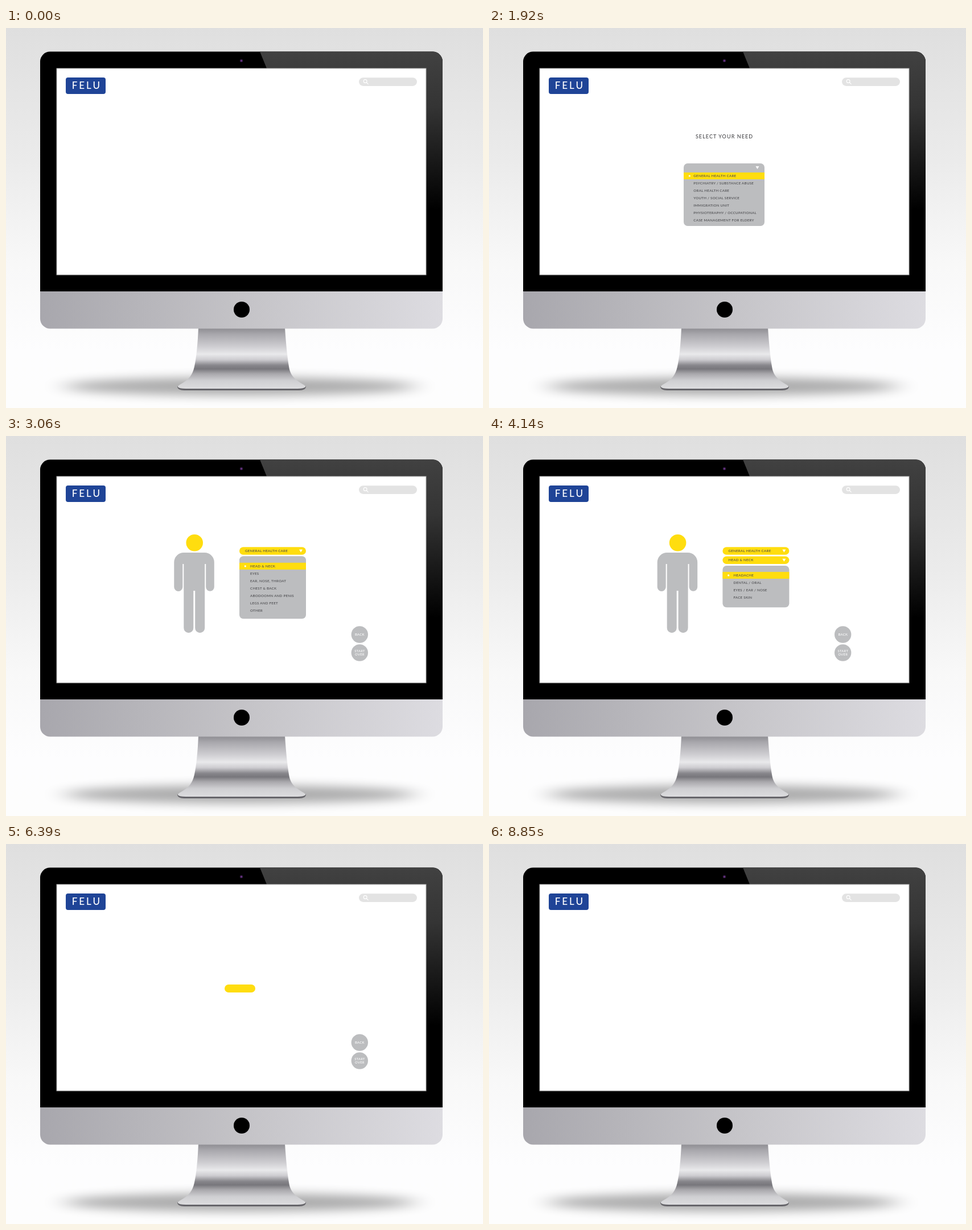
An HTML page that plays this animation: 838 by 668 pixels, repeating every 9030 ms.

```html
<!DOCTYPE html>
<html lang="en">
<head>
<meta charset="utf-8">
<title>Health guide on a desktop screen</title>
<style>
  html, body { margin: 0; width: 100%; height: 100%; overflow: hidden; background: #fff; }
  svg { display: block; width: 838px; height: 668px; }
  text { font-family: Lato, "Open Sans", sans-serif; font-weight: 500; white-space: pre; }
  .scene { opacity: 0; }
</style>
</head>
<body>
<svg viewBox="0 0 838 668" xmlns="http://www.w3.org/2000/svg">
  <defs>
    <linearGradient id="wall" x2="0" y2="1">
      <stop stop-color="#dfdfdf"/><stop offset=".35" stop-color="#ebebeb"/>
      <stop offset=".62" stop-color="#f8f8f8"/><stop offset=".85" stop-color="#fdfdfe"/>
      <stop offset="1" stop-color="#fdfdfd"/>
    </linearGradient>
    <linearGradient id="glare" x2="0" y2="1">
      <stop stop-color="#414141"/><stop offset=".35" stop-color="#343434"/><stop offset="1" stop-color="#000"/>
    </linearGradient>
    <linearGradient id="chin">
      <stop stop-color="#a8a7ad"/><stop offset=".5" stop-color="#c4c3c7"/><stop offset="1" stop-color="#dddce1"/>
    </linearGradient>
    <linearGradient id="stand" gradientUnits="userSpaceOnUse" x1="0" y1="528" x2="0" y2="636">
      <stop stop-color="#8f8e93"/><stop offset=".1" stop-color="#a9a8ad"/>
      <stop offset=".3" stop-color="#cfced2"/><stop offset=".42" stop-color="#e9e9eb"/>
      <stop offset=".51" stop-color="#cdccd0"/><stop offset=".6" stop-color="#88878c"/>
      <stop offset=".66" stop-color="#78777c"/><stop offset=".74" stop-color="#a9a8ac"/>
      <stop offset=".85" stop-color="#cfcfd2"/><stop offset="1" stop-color="#dedee0"/>
    </linearGradient>
    <filter id="soft" x="-20%" y="-200%" width="140%" height="500%"><feGaussianBlur stdDeviation="22 9"/></filter>
  </defs>

  <rect width="838" height="668" fill="url(#wall)"/>
  <ellipse cx="411" cy="630" rx="310" ry="16" fill="#000" opacity=".32" filter="url(#soft)"/>

  <path d="M301 630q0 7 12 7h202q12 0 12-7z" fill="#66656a"/>
  <path d="M338 527h152q3 45 7 68c2 15 10 23 24 31q6 3 5 5-3 3-14 3H316q-12 0-14-3-1-2 5-5c14-8 21-16 24-31q5-23 7-68z" fill="url(#stand)"/>

  <path d="M60 463V59a17.500 17.500 0 0 1 17.500-17.500h672A17.500 17.500 0 0 1 767 59v404z"/>
  <path d="M446 41.500h303.500A17.500 17.500 0 0 1 767 59v260h-29V71H458z" fill="url(#glare)"/>
  <path d="M60 463h707v48a17.500 17.500 0 0 1-17.500 17.500h-672A17.500 17.500 0 0 1 60 511z" fill="url(#chin)"/>
  <circle cx="413.500" cy="57.500" r="2.800" fill="#2a1838"/>
  <circle cx="413.500" cy="57.500" r="1.500" fill="#70358c"/>
  <circle cx="414" cy="495" r="14"/>
  <rect x="89" y="71" width="649" height="363" fill="#fff" stroke="#a5a5a5"/>

  <g id="page"></g>
</svg>

<script>
const LOOP = 9030;
const YELLOW = '#ffdd0f', GREY = '#bcbdbf', BLUE = '#1f4497', INK = '#48484b', WHITE = '#fff';

const el = (tag, attrs, body = '') =>
  `<${tag} ${Object.entries(attrs).map(([k, v]) => `${k}="${v}"`).join(' ')}>${body}</${tag}>`;
const box = (x, y, width, height, fill, rx = 0) => el('rect', { x, y, width, height, fill, rx });
const disc = (cx, cy, r, fill) => el('circle', { cx, cy, r, fill });

// y is the middle of the capitals
function text(x, y, str, size, gap = 0, fill = INK, weight = 500, anchor = 'start') {
  const shift = anchor === 'middle' ? gap / 2 : 0;
  return el('text', {
    x: x + shift, y: y + size * .36, fill, 'font-size': size,
    'letter-spacing': gap, 'font-weight': weight, 'text-anchor': anchor
  }, str.replace(/&/g, '&amp;'));
}
const mid = (x, y, str, size, gap, fill, weight) => text(x, y, str, size, gap, fill, weight, 'middle');
const item = (x, y, str, weight) => text(x, y, str, 6.2, .27, INK, weight);
const arrow = (x, y) => el('path', { d: `M${x - 3} ${y - 2.5}h6l-3 5z`, fill: WHITE });
const star = (x, y) => disc(x, y, 1.6, WHITE);

function bubble(x, y, r, fill, lines, size, gap, ink, weight, pitch) {
  const top = y - (lines.length - 1) * pitch / 2;
  return disc(x, y, r, fill) +
    lines.map((s, i) => mid(x, top + i * pitch, s, size, gap, ink, weight)).join('');
}

function pill(x, y, w, label, indent, weight) {
  return box(x, y, w, 13.5, YELLOW, 6.75) + item(x + indent, y + 6.8, label, weight) + arrow(x + w - 9, y + 6.8);
}

// Dropdown panel; pick is the highlighted row, -1 for none
function menu({ x, y, w, h, first, indent, rows, pick, dot = true }) {
  let out = box(x, y, w, h, GREY, 7);
  if (pick >= 0) {
    const cy = first + pick * 12.93;
    out += box(x, cy - 6, w, 12, YELLOW) + (dot ? star(x + 10.3, cy) : '');
  }
  return out + rows.map((s, i) => item(x + indent, first + i * 12.93, s)).join('');
}

const heading = (str, gap) => mid(413, 191, str, 9, gap);

const nav = bubble(621.3, 349, 14.7, GREY, ['BACK'], 6, .25, WHITE, 700, 0) +
  bubble(621.3, 381, 14.7, GREY, ['START', 'OVER'], 5.8, .3, WHITE, 700, 6.5);

const person = head => disc(331.2, 187.8, 14.8, head) + el('path', {
  d: 'M295.300 222a17 17 0 0 1 17-17h36.500a17 17 0 0 1 17 17v43.500a7.300 7.300 0 0 1-14.600 0V225h-2' +
     'V337.500a8.500 8.500 0 0 1-17 0V272h-2.900V337.500a8.500 8.500 0 0 1-17 0V225h-2V265.500a7.500 7.500 0 0 1-15 0z',
  fill: GREY
});

const needs = ['GENERAL HEALTH CARE', 'PSYCHIATRY / SUBSTANCE ABUSE', 'ORAL HEALTH CARE',
  'YOUTH / SOCIAL SERVICE', 'IMMIGRATION UNIT', 'PHYSIOTERAPHY / OCCUPATIONAL', 'CASE MANAGEMENT FOR ELDERY'];
const parts = ['HEAD & NECK', 'EYES', 'EAR, NOSE, THROAT', 'CHEST & BACK',
  'ABODOOMN AND PENIS', 'LEGS AND FEET', 'OTHER'];
const pains = ['HEADACHE', 'DENTAL / ORAL', 'EYES / EAR / NOSE', 'FACE SKIN'];

const start = mid(418, 201.5, 'HOW CAN WE HELP YOU?', 9, 1.35) +
  bubble(411.3, 284.3, 33, YELLOW, ['START'], 15, 1.3, BLUE, 500, 0);

const needTitle = heading('SELECT YOUR NEED', 1.08);
const needClosed = needTitle + box(342, 238, 142, 16, GREY, 7) + arrow(471.5, 245.5);
const needOpen = needTitle + menu({ x: 342, y: 238, w: 142, h: 110, first: 260, indent: 17.3, rows: needs, pick: 0 }) +
  arrow(471.5, 245.5);

const care = pill(410, 195.3, 117, 'GENERAL HEALTH CARE', 10);
const partStep = (head, pick) => person(head) + care + nav +
  menu({ x: 410, y: 211.3, w: 117, h: 110, first: 228.8, indent: 19, rows: parts, pick });
const painStep = pick => el('g', { transform: 'translate(.4)' }, person(YELLOW) + care + nav +
  pill(410, 211.4, 117, 'HEAD & NECK', 10, 700) +
  menu({ x: 410, y: 228, w: 117, h: 73.3, first: 244.9, indent: 19, rows: pains, pick }));

const severity = heading('HOW SEVERE IS YOUR HEADACHE?', 1.2).replace('x="413', 'x="416') +
  pill(375, 256.3, 75, 'HEADACHE', 17) + nav;
const levels = menu({ x: 375, y: 273.3, w: 76.3, h: 54, first: 286.1, indent: 12,
  rows: ['MILD', 'MODERATE', 'SEVERE'], pick: 2, dot: false });

const answer = fill => box(384, 247, 54, 14, fill, 7) + nav;

function result() {
  const note = ['The headache should resolve as your other symptoms',
    'improve. You can take over the counter pain relievers such',
    'as acetaminophen, ibuprofen, or naproxen for the',
    'headache. If the headache gets worse or doesnt resolve',
    'over the next several days, contact your doctor for', 'advice.'];
  const bold = (x, y, s, size = 7.2, gap = 1.12) => text(x, y, s, size, gap, INK, 700);
  return box(217.7, 170.3, 177, 152.5, YELLOW, 7) +
    bold(233, 184, 'POSSIBLE REASONS OF YOUR') + bold(233, 192, 'SYMTOMS ARE:') +
    box(217.7, 203.3, 177, 12, BLUE) + star(226, 209.2) +
    text(233, 209.4, 'FLU', 7, 1, WHITE, 700) + arrow(376, 209.4) +
    note.map((s, i) => text(239, 223.3 + i * 6.15, s, 4.9, .02)).join('') +
    ['STRESS', 'TUMOR', 'ETC'].map((s, i) => bold(233, 267 + i * 20.2, s) + arrow(376, 267 + i * 20.2)).join('') +
    ['THROUGHOUT YOUR DIGNOSIS, FELU', 'SUGGEST THAT MAKING CONTACT TO', 'HEALTH CENTER']
      .map((s, i) => text(429, 202.5 + i * 8.3, s, 7.6, .98, INK, 600)).join('') +
    bubble(447, 263.7, 18, GREY, ['CALL'], 7, 1.2, WHITE, 700, 0) +
    bubble(494.5, 263.7, 18, GREY, ['BOOKING', 'ONLINE'], 5.1, .4, WHITE, 700, 6.2) +
    bubble(542, 262.8, 18, GREY, ['EMERGENCY', 'CALL'], 5, 0, WHITE, 700, 6.2) +
    bubble(589.4, 262.6, 18, YELLOW, ['MORE', 'HELP'], 5.6, .7, INK, 700, 6.3) +
    bubble(501.6, 354, 29.7, YELLOW, ['DO YOU', 'NEED MORE', 'HELP?'], 6.2, .75, INK, 700, 7) + nav;
}

const header = box(105, 87, 70, 29, BLUE, 4) + mid(140.3, 101.3, 'FELU', 17, 3, WHITE) +
  box(620, 87.3, 102, 14.6, '#e3e3e3', 7.3) +
  el('path', { d: 'M633.300 95.600l3.200 3.200M634 93.500a2.900 2.900 0 1 1-5.800 0a2.900 2.900 0 1 1 5.800 0',
    fill: 'none', stroke: WHITE, 'stroke-width': 1.2 });

// [start in ms, picture]
const steps = [
  [0, start],
  [780, needClosed],
  [1920, needOpen],
  [2670, partStep(GREY, -1)],
  [3060, partStep(YELLOW, 0)],
  [3810, painStep(-1)],
  [4140, painStep(0)],
  [4920, severity],
  [5250, severity + levels],
  [6030, answer(GREY)],
  [6390, answer(YELLOW)],
  [7170, result()],
  [8850, '']
];

const page = document.getElementById('page');
page.innerHTML = header + steps.map(s => el('g', { class: 'scene' }, s[1])).join('');

page.querySelectorAll('.scene').forEach((scene, i) => {
  const from = steps[i][0] / LOOP;
  const to = i + 1 < steps.length ? steps[i + 1][0] / LOOP : 1;
  const key = (offset, opacity) => ({ offset, opacity, easing: 'step-end' });
  scene.animate([key(0, 0), key(from, 1), key(to, 0), key(1, 0)], { duration: LOOP, iterations: Infinity });
});
</script>
</body>
</html>
```
